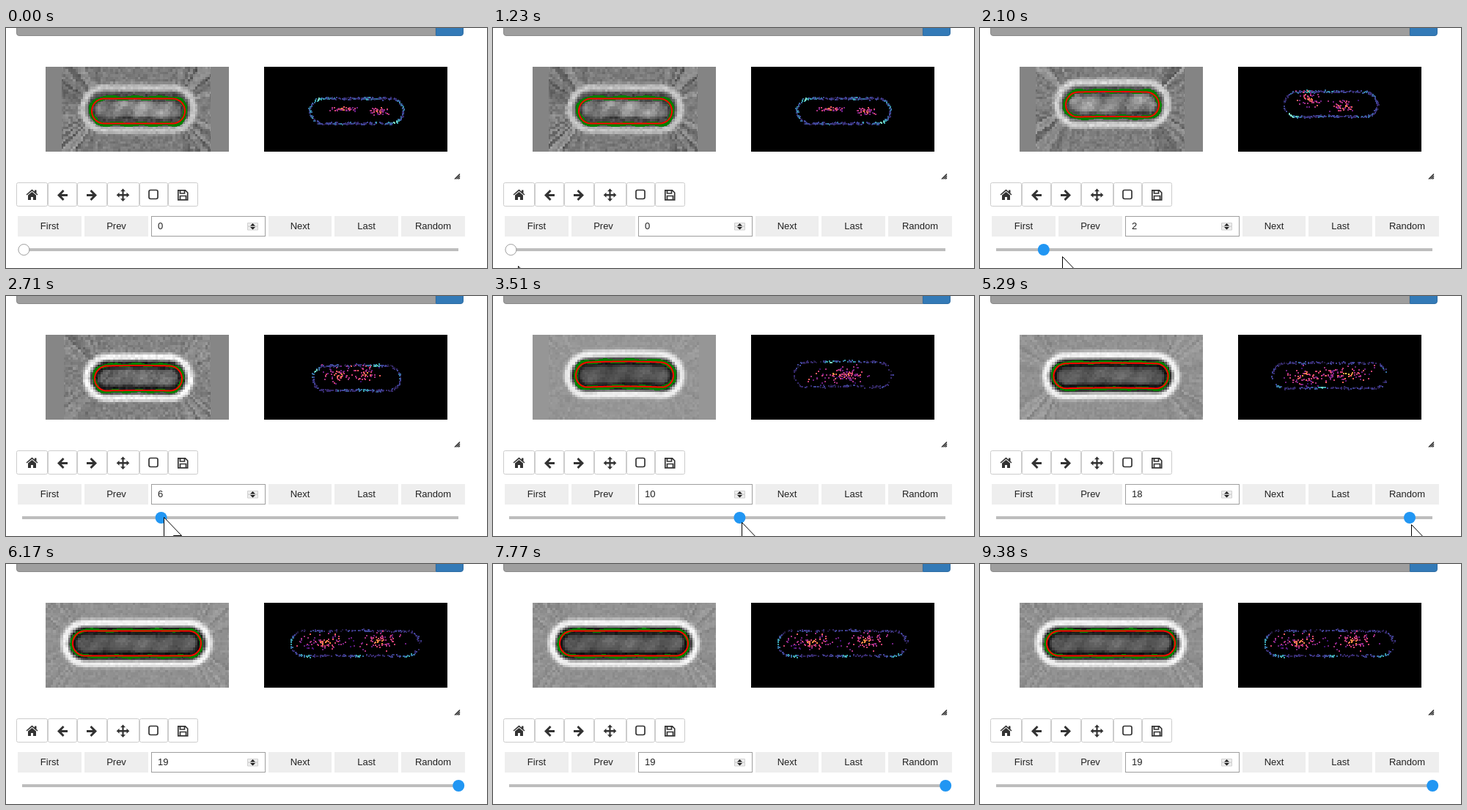
Write an HTML page with a canvas that moves like this. It is 656x328 px and loops after 9.44 s.

```html
<!DOCTYPE html>
<html lang="en">
<head>
<meta charset="utf-8">
<title>Cell browser</title>
<style>
  html, body { margin: 0; width: 100%; height: 100%; overflow: hidden; background: #fff; }
  #stage { position: relative; width: 656px; height: 328px; overflow: hidden; }
  canvas { position: absolute; top: 53px; }
  #bright { left: 54px; }
  #dots { left: 352px; }
  svg { position: absolute; inset: 0; }
  text { font: 13px "Liberation Sans", Arial, sans-serif; fill: #222; }
</style>
</head>
<body>
<div id="stage">
  <canvas id="bright" width="250" height="116"></canvas>
  <canvas id="dots" width="250" height="116"></canvas>
  <svg width="656" height="328" viewBox="0 0 656 328">
    <path d="M14.500 -1V7Q14.500 10.500 18 10.500H586V-1Z" fill="#9e9e9e" stroke="#8a8a8a"/>
    <path d="M586.500 -1V10.500H620Q623.500 10.500 623.500 7V-1Z" fill="#337ab7" stroke="#2e6da4"/>
    <path d="M612 206.500l7-7M614.500 206.500l4.500-4.500M617 206.500l2-2" stroke="#222" stroke-width="1.300" fill="none"/>
    <g id="tools" fill="#fff" stroke="#ccc"></g>
    <g fill="#333">
      <path d="M35.500 220.500l8 6.900-1 1.200-7-5.900-7 5.900-1-1.200zM39 221.500h2.500v4.500l-2.500-2zM35.500 224l5.500 4.600v6.400h-4v-4h-3v4h-4v-6.400z"/>
      <path id="arrow" d="M70 228.500l7.500-7.500 2 2-3.700 3.900h8.200v3.200h-8.200l3.700 3.900-2 2z"/>
      <use href="#arrow" transform="matrix(-1 0 0 1 194 0)"/>
      <path d="M159.500 219.500l3.500 3.800h-2.400v3.800h3.900v-2.400l3.800 3.500-3.800 3.500v-2.300h-3.900v3.900h2.400l-3.500 3.700-3.500-3.700h2.400v-3.900h-3.900v2.300l-3.800-3.500 3.800-3.500v2.400h3.900v-3.800h-2.400z"/>
    </g>
    <g fill="none" stroke="#333" stroke-width="1.700">
      <rect x="195" y="221.500" width="12" height="12" rx="2.200"/>
      <path d="M234.800 221.800h9.700l3.200 3.200v9.800h-12.900zM237.500 222v4h6v-4M237.500 234.500v-5h8v5"/>
    </g>
    <g id="buttons"></g>
    <rect x="198.500" y="257.500" width="155" height="27" fill="#fff" stroke="#9e9e9e"/>
    <text id="count" x="207" y="275">0</text>
    <path d="M329.500 266.500h14v4.500h-14zM329.500 271.500h14v4.500h-14z" fill="#eee" stroke="#d0d0d0"/>
    <path d="M333 270.500l3.500-3.500 3.500 3.500zM333 272l3.500 3.500 3.500-3.500z" fill="#222"/>
    <rect x="22" y="301" width="595" height="4" fill="#bdbdbd"/>
    <circle id="knob" cy="303" r="8"/>
    <path id="cursor" d="M0 0V34L8 26 13 38 18 36 13 25H24Z" fill="#fff" stroke="#000"/>
  </svg>
</div>
<script>
const LOOP = 9440, W = 250, H = 116, PIXEL = 3.4;
const $ = id => document.getElementById(id);
const bright = $('bright').getContext('2d'), dots = $('dots').getContext('2d');

// Toolbar and navigation buttons
const edges = [14, 57, 97, 138, 182, 221, 262];
$('tools').innerHTML = edges.slice(1).map((x, i) =>
  `<rect x="${edges[i] + .5}" y="211.500" width="${x - edges[i] - 1}" height="32" rx="2"/>`).join('');
const buttons = { First: [16, 103], Prev: [107, 194], Next: [358, 444], Last: [448, 535], Random: [539, 626] };
$('buttons').innerHTML = Object.entries(buttons).map(([label, [x, end]]) =>
  `<rect x="${x}" y="257" width="${end - x}" height="28" fill="#eee"/>
   <text x="${(x + end) / 2}" y="275" text-anchor="middle">${label}</text>`).join('');

// box: left, right, centre y, bend; pad: image limits, grey; halo: distance, vertical shift
// tone: background, inside, edge, halo, grain, rays, blobs
// spots: x, y, spread x, spread y, count; hot: x, y of bright membrane points
const cells = {
  0: { box: [63, 190, 60.5, 0], pad: [22, 225, 132], halo: [12, -3], tone: [124, 136, 68, 195, 20, 46, 34],
    band: 5, ring: [400, .8], spots: [[108, 58, 15, 2, 45], [157, 61, 10, 4, 38]], hot: [[73, 45], [180, 76]] },
  2: { box: [63, 190, 52, 1], pad: [22, 225, 132], halo: [12, -1], tone: [126, 138, 70, 208, 20, 42, 34],
    band: 5, ring: [380, .72], spots: [[97, 44, 12, 10, 60], [143, 54, 15, 7, 50]], hot: [[73, 69], [97, 35]] },
  6: { box: [67, 186, 60, 1], pad: [25, 225, 134], halo: [11, -1], tone: [130, 108, 28, 242, 20, 24, 15],
    band: 4, ring: [320, .6], spots: [[101, 55, 15, 10, 55], [137, 53, 12, 8, 50]], hot: [[72, 49], [153, 43], [135, 76]] },
  10: { box: [59, 192, 55.5, 2], pad: [22, 227, 150], halo: [11, 0], tone: [150, 85, 28, 236, 9, 10, 15],
    band: 5, ring: [190, .48], spots: [[117, 54, 28, 8, 80], [132, 56, 10, 5, 35]], hot: [[108, 37], [129, 37], [142, 38]] },
  15: { box: [67, 178, 61, 5], pad: [28, 219, 144], halo: [11, 0], tone: [143, 98, 36, 236, 10, 10, 15],
    band: 4, ring: [170, .48], spots: [[108, 59, 16, 11, 85]], hot: [[131, 39], [69, 70], [88, 76]] },
  19: { box: [37, 212, 55.5, 0], pad: [0, 250, 145], halo: [11, 0], tone: [145, 95, 20, 240, 11, 18, 15],
    band: 4, ring: [290, .56], spots: [[85, 54, 28, 9, 85], [158, 53, 26, 9, 75]], hot: [[38, 53], [58, 73], [131, 72], [198, 72]] }
};
const membrane = ['#1f1838', '#35296b', '#3e4595', '#356f9f', '#38a3aa', '#79d6c0'];
const signal = ['#3b0f70', '#6d1f80', '#a3307e', '#cf406f', '#f1605d', '#fc9440', '#ffd34e'];

function random(seed) {
  let a = seed * 7919 + 17;
  return () => {
    a = a + 0x6D2B79F5 | 0;
    let t = Math.imul(a ^ a >>> 15, 1 | a);
    t = t + Math.imul(t ^ t >>> 7, 61 | t) ^ t;
    return ((t ^ t >>> 14) >>> 0) / 4294967296;
  };
}

function mix(points, t, column = 1) {
  if (t <= points[0][0]) return points[0][column];
  for (let i = 1; i < points.length; i++) {
    const a = points[i - 1], b = points[i];
    if (t <= b[0]) return a[column] + (b[column] - a[column]) * (t - a[0]) / (b[0] - a[0]);
  }
  return points.at(-1)[column];
}

// Cells without an own entry vary the closest one
function getCell(index) {
  if (cells[index]) return cells[index];
  const key = Object.keys(cells).reduce((a, b) => Math.abs(b - index) < Math.abs(a - index) ? b : a);
  const base = cells[key], rnd = random(index + 50);
  const vary = n => (rnd() - .5) * n;
  const [left, right, y, bend] = base.box, grow = vary(22), lift = vary(6);
  return { ...base,
    box: [left - grow, right + grow, y + lift, bend + vary(3)],
    spots: base.spots.map(([x, sy, ...rest]) => [x + vary(20), sy + lift + vary(4), ...rest]),
    hot: base.hot.map(([x, hy]) => [x + vary(30), hy + lift]) };
}

function shape(cell) {
  const [left, right, y, bend] = cell.box, r = 17;
  const cx = (left + right) / 2, half = (right - left) / 2, len = half - r;
  const middle = x => y - bend * Math.max(0, 1 - ((x - cx) / half) ** 2);
  const clampX = x => Math.max(cx - len, Math.min(cx + len, x));
  const distance = (x, py) => Math.hypot(x - clampX(x), py - middle(x)) - r;
  const side = 2 * len, cap = Math.PI * r, total = 2 * (side + cap);
  // Walks round the outline, s from 0 to 1, at a distance outside it
  const at = (s, out = 0) => {
    let p = s % 1 * total, sign = 1;
    if (p >= total / 2) { p -= total / 2; sign = -1; }
    let x, dy;
    if (p < side) { x = p - len; dy = -r - out; }
    else {
      const a = (p - side) / r;
      x = len + Math.sin(a) * (r + out);
      dy = -Math.cos(a) * (r + out);
    }
    x = cx + sign * x;
    return [x, middle(x) + sign * dy];
  };
  return { at, distance, clampX, middle };
}

function drawBright(cell, form, seed) {
  const rnd = random(seed + 1), [bg, inner, edge, glow, grain, rays, blobs] = cell.tone;
  const [ring, shift] = cell.halo;
  const profile = [[-13, inner], [-8, inner - 8], [-3, edge], [ring - 8, edge + 8], [ring - 2, glow],
    [ring + 2, glow], [ring + 7, bg + 8], [ring + 10, bg]];
  const table = Array.from({ length: 96 }, () => rnd() - .5);
  const [from, to, grey] = cell.pad;
  bright.fillStyle = `rgb(${grey},${grey},${grey})`;
  bright.fillRect(0, 0, W, H);
  for (let j = 0; j < 35; j++) for (let i = 0; i < 74; i++) {
    const x = (i + .5) * PIXEL, y = (j + .5) * PIXEL - shift, d = form.distance(x, y);
    let v = mix(profile, d) + (rnd() + rnd() - 1) * grain;
    if (d < -4) v += blobs * Math.sin(x * .13 + seed) * Math.sin(x * .07 + y * .12 + 1);
    const over = x - form.clampX(x);
    if (d > ring + 5 && over) {
      const a = Math.atan2(y - form.middle(x), over);
      v += table[Math.floor((a + Math.PI) * 15)] * rays * 1.6 * Math.abs(Math.sin(2 * a));
    }
    v = Math.max(0, Math.min(255, Math.round(v)));
    const px = Math.max(from, Math.round(i * PIXEL)), end = Math.min(to, Math.round((i + 1) * PIXEL));
    if (end <= px) continue;
    const py = Math.round(j * PIXEL);
    bright.fillStyle = `rgb(${v},${v},${v})`;
    bright.fillRect(px, py, end - px, Math.round((j + 1) * PIXEL) - py);
  }
  bright.fillStyle = '#008000';
  for (let k = 0; k < 180; k++) {
    const [x, y] = form.at(k / 180, .6 + .9 * Math.sin(k * .31 + seed) + rnd() * .6);
    bright.fillRect(Math.round(x - cell.band / 2), Math.round(y - cell.band / 2), cell.band, cell.band);
  }
  bright.beginPath();
  for (let k = 0; k < 200; k++) bright.lineTo(...form.at(k / 200));
  bright.closePath();
  bright.strokeStyle = '#f00';
  bright.lineWidth = 2;
  bright.stroke();
}

function drawDots(cell, form, seed) {
  const rnd = random(seed + 100), spread = () => (rnd() + rnd() + rnd() - 1.5) * 1.3;
  const dot = (x, y, heat, colours) => {
    const n = Math.floor(Math.max(0, Math.min(.999, heat)) * colours.length);
    dots.fillStyle = colours[n];
    dots.fillRect(Math.round(x) - 1, Math.round(y) - 1, 2, 2);
  };
  dots.fillStyle = '#000';
  dots.fillRect(0, 0, W, H);
  const [count, level] = cell.ring;
  for (let k = 0; k < count; k++) {
    const s = rnd(), [x, y] = form.at(s, spread() * 1.2);
    const patch = .8 + .2 * Math.sin(s * 37 + seed);
    const near = cell.hot.reduce((m, h) => Math.max(m, Math.exp(-((x - h[0]) ** 2 + (y - h[1]) ** 2) / 60)), 0);
    dot(x, y, (.25 + .75 * rnd()) * level * patch + near * .5, membrane);
  }
  for (const [x, y, sx, sy, n] of cell.spots)
    for (let k = 0; k < n; k++) {
      const u = spread(), v = spread();
      dot(x + u * sx, y + v * sy, .1 + .5 * rnd() + .35 * Math.exp(-(u * u + v * v) * 5), signal);
    }
}

// Time, slider value
const values = [[1800, 1], [2050, 2], [2680, 6], [3480, 10], [4590, 15], [5450, 19]];
// Time, pointer x, pointer y
const pointer = [[1050, 40, 340], [1450, 27, 306], [1750, 30, 305], [2100, 112, 312], [2710, 215, 302],
  [3510, 339, 309], [4610, 489, 312], [5500, 618, 312], [5850, 622, 314], [6150, 670, 340]];
let shown = -1;

function show(index) {
  const cell = getCell(index), form = shape(cell), knob = $('knob');
  drawBright(cell, form, index);
  drawDots(cell, form, index);
  $('count').textContent = index;
  knob.setAttribute('cx', 24.4 + index * 31.2);
  knob.setAttribute('r', index ? 8 : 7.5);
  knob.setAttribute('fill', index ? '#2196f3' : '#fff');
  knob.setAttribute('stroke', index ? 'none' : '#9e9e9e');
  shown = index;
}

function tick() {
  const t = performance.now() % LOOP;
  const index = t < values[0][0] ? 0 : Math.floor(mix(values, t) + 1e-6);
  if (index !== shown) show(index);
  const x = mix(pointer, t), y = mix(pointer, t, 2);
  $('cursor').setAttribute('transform', `translate(${Math.round(x) + .5} ${Math.round(y) + .5})`);
  requestAnimationFrame(tick);
}
tick();
</script>
</body>
</html>
```
